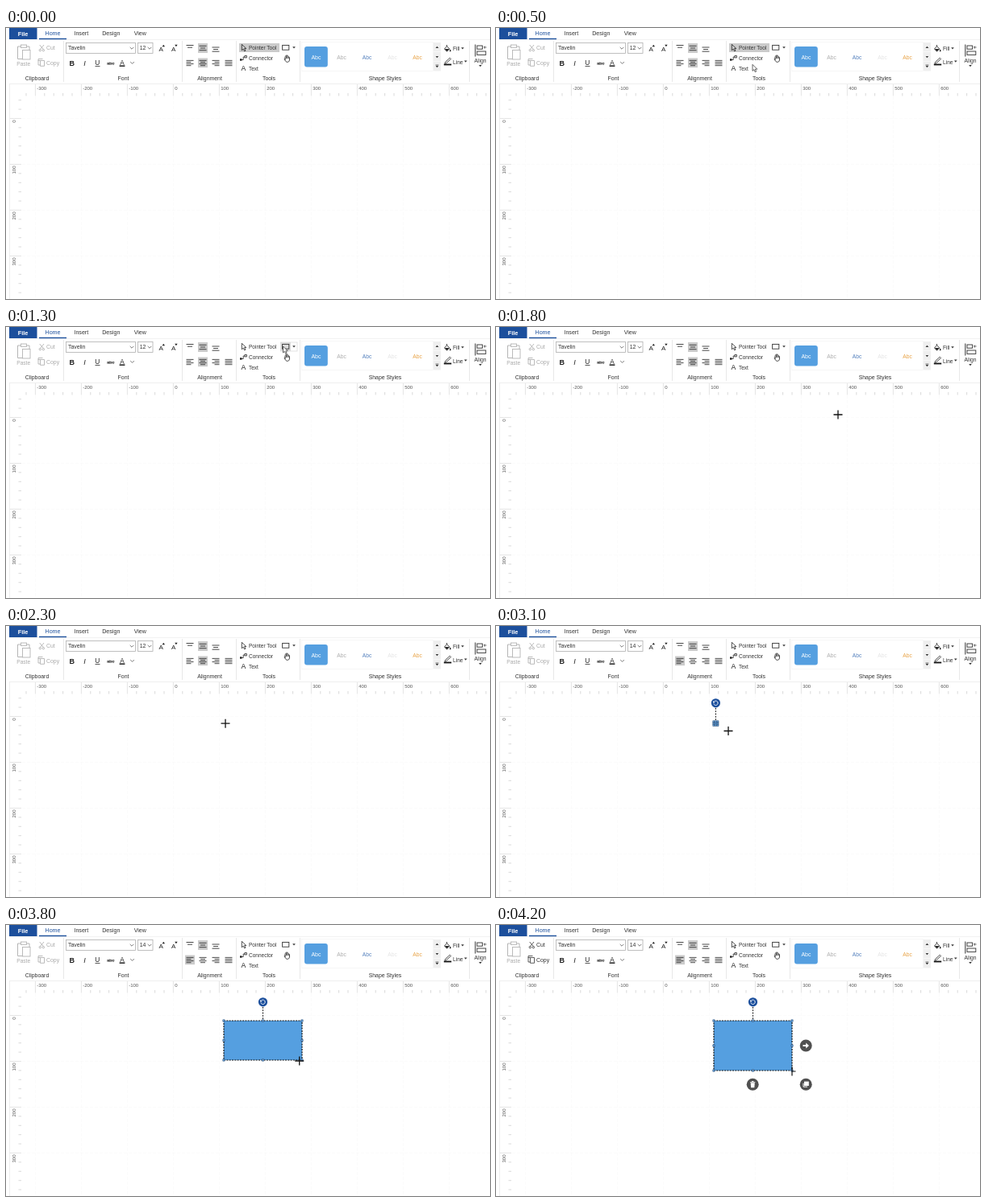
Recreate the animation shown at these times as an HTML page. Size 600 by 337 pixels, loop 4.3 s.

```html
<!DOCTYPE html>
<html lang="en">
<head>
<meta charset="utf-8">
<title>Drawing a rectangle</title>
<style>
html, body { margin: 0; width: 100%; height: 100%; overflow: hidden; background: #fff; }
svg { display: block; width: 100%; height: 100%; font-family: "Liberation Sans", Arial, sans-serif; }
</style>
</head>
<body>
<svg id="stage" viewBox="0 0 600 337" preserveAspectRatio="none"></svg>
<script>
const LOOP = 4300, STEP = 100;
const BLUE = '#1c4f9c', SHAPE = '#559fe0', INK = '#333', PALE = '#a9a9a9';
const stage = document.getElementById('stage');

const path = (d, stroke = INK, w = 0.8, extra = '') =>
  `<path d="${d}" fill="none" stroke="${stroke}" stroke-width="${w}" ${extra}/>`;
const solid = (d, fill = INK) => `<path d="${d}" fill="${fill}"/>`;
const rect = (x, y, w, h, fill = 'none', extra = '') =>
  `<rect x="${x}" y="${y}" width="${w}" height="${h}" fill="${fill}" ${extra}/>`;
const text = (x, y, s, size = 7, fill = INK, extra = '') =>
  `<text x="${x}" y="${y}" font-size="${size}" fill="${fill}" ${extra}>${s}</text>`;
const mid = 'text-anchor="middle"';
const group = (id, body) => `<g id="${id}">${body}</g>`;
const chevron = (x, y) => path(`M${x - 2.3} ${y - 1.1}l2.3 2.3 2.3-2.3`, '#444', 0.7);
const down = (x, y) => solid(`M${x - 1.8} ${y - 1}h3.6l-1.8 2.2z`);
const bars = (x, y, gap, widths, align) => path(widths.map((w, i) => {
  const left = align === 'left' ? x - 4.5 : align === 'right' ? x + 4.5 - w : x - w / 2;
  return `M${left} ${y + i * gap}h${w}`;
}).join(''), '#333', 0.9);

function tabs() {
  return rect(4, 0, 34.5, 14, BLUE) +
    text(21, 9.6, 'File', 7.4, '#fff', mid + ' font-weight="bold"') +
    text(58, 9.3, 'Home', 7.1, BLUE, mid) + text(93.3, 9.3, 'Insert', 7.1, INK, mid) +
    text(130.3, 9.3, 'Design', 7.1, INK, mid) + text(166.3, 9.3, 'View', 7.1, INK, mid) +
    path('M4 14.5H600', '#ececec', 0.7) + rect(41, 12.8, 34, 1.4, BLUE);
}

function clipboard() {
  return path('M19 23h-4.5v15.500h5.500M25 23h4v4', '#b4b4b4', 1) +
    rect(18.5, 21, 7, 3.4, '#fff', 'stroke="#b4b4b4" stroke-width=".9"') +
    rect(20.5, 27.5, 9.5, 11.5, '#fff', 'stroke="#b4b4b4" stroke-width=".9"') +
    text(21.7, 47, 'Paste', 6.6, PALE, mid) +
    `<g id="edit" fill="${PALE}" stroke="${PALE}">
      <g fill="none" stroke-width=".8"><path d="M41.700 21l4.800 5.800M47 21l-4.800 5.800"/>
      <circle cx="42.300" cy="27.700" r="1.200"/><circle cx="46.400" cy="27.700" r="1.200"/>
      <path d="M42.500 40.500h-2.500v-2h5.500M40 40v6h2M42.500 40.500h5v6.800h-5z"/></g>
      <g stroke="none" font-size="6.900"><text x="50" y="27.300">Cut</text><text x="50" y="45.500">Copy</text></g>
    </g>`;
}

function fontGroup() {
  const box = 'stroke="#b0b0b0" stroke-width=".8"';
  return rect(74.5, 18.5, 86, 13, '#fff', box) + text(77, 27.4, 'Tavelin', 6.9) + chevron(156, 25) +
    rect(163.5, 18.5, 18.5, 13, '#fff', box) + text(165.7, 27.4, '12', 6.9, INK, 'id="size"') + chevron(178, 25) +
    text(189.5, 28.8, 'A', 8, '#222') + solid('M193.600 23.200l1.700-2.400 1.700 2.400z', '#222') +
    text(205, 28.8, 'A', 8, '#222') + solid('M209.200 20.800h3.400l-1.700 2.400z', '#222') +
    text(81.8, 46.5, 'B', 9, '#222', mid + ' font-weight="bold"') +
    text(97.6, 46.5, 'I', 9, '#222', mid + ' font-style="italic"') +
    text(113.4, 46, 'U', 8.4, '#222', mid) + path('M110.500 47.600h6', '#222', 0.8) +
    text(129.8, 45.8, 'abc', 5.7, '#222', mid) + path('M125 44h9.600', '#222', 0.7) +
    text(144, 45.5, 'A', 8.2, '#222', mid) + rect(140.6, 46.5, 6.8, 1.4, '#111') + chevron(156.5, 43.2);
}

function alignment() {
  const rows = [9, 6, 9, 6];
  return rect(238, 19, 12, 12, '#cbcbcb') + rect(238, 37.5, 12, 11.7, '#cbcbcb', 'id="chosen"') +
    bars(228, 21.5, 2.7, [9, 6]) + bars(244, 22.3, 2.7, [9, 6, 9]) + bars(260, 24, 2.6, [9, 6, 9]) +
    bars(228, 40.4, 2.1, rows, 'left') + bars(244, 40.4, 2.1, rows) +
    bars(260, 40.4, 2.1, rows, 'right') + bars(276, 40.4, 2.1, [9, 9, 9, 9]);
}

function tools() {
  return rect(289, 19, 50, 11, '#cbcbcb', 'id="active"') +
    path('M292.300 20.300v7.500l1.900-1.600 1.400 2.700 1.300-.6-1.400-2.700h2.400z', '#222', 0.8) +
    text(301, 26.9, 'Pointer Tool', 6.5) +
    path('M292 39.500h2.200v-3.500h2', '#222', 0.8) + rect(290, 38.3, 2.4, 2.4, '#222') +
    rect(296, 34.6, 2.3, 2.3, '#fff', 'stroke="#222" stroke-width=".8"') +
    text(301, 39.9, 'Connector', 6.5) +
    text(291.6, 53.4, 'A', 8.7, '#222') + text(301, 52.8, 'Text', 6.5) +
    group('hover', rect(340.5, 19, 12.5, 11, '#dcdcdc') + rect(340.5, 19, 20.5, 11, 'none', 'stroke="#d6d6d6" stroke-width=".7"')) +
    rect(342.6, 21.4, 8.2, 5.8, 'none', 'stroke="#333" stroke-width=".9"') + down(357, 24.2) +
    path('M346 39.500v-4q.7-1.300 1.400 0v-1.300q.7-1.200 1.400 0v1q.8-1 1.400.2v1q.9-.8 1.300.4v3.200q-.4 2.300-2.300 2.300h-1.200q-1.100 0-3-3.700 .4-1.200 1.600.3M347.400 35.500v2.500M348.800 35.200v2.800M350.200 36.400v1.800', '#222', 0.8);
}

function styles() {
  const samples = [[416, '#ababab'], [447.500, '#5580bd'], [479, '#e4e4e4'], [510, '#e8a245']];
  return rect(366.5, 17.5, 163, 36, 'none', 'stroke="#f1f1f1" stroke-width=".6"') +
    rect(370, 23, 28.8, 25.4, SHAPE, 'rx="3"') +
    text(384.4, 38.6, 'Abc', 6.9, '#fff', mid) +
    samples.map(([x, c]) => text(x, 38.6, 'Abc', 6.7, c, mid)).join('') +
    [18, 30, 42].map(y => rect(530, y, 9, 11.5, '#efefef')).join('') +
    solid('M532.500 25h3.800l-1.900-2.200z') + down(534.4, 36) + down(534.4, 48) + path('M532.500 46h3.800', INK, 0.7) +
    path('M543.500 26l3-3.200 3.300 3.200-3.300 3.100zM546.500 22.800v-1.800', '#222', 0.9) +
    solid('M544 26h5.500l-3 3zM550.700 26.200q1.800 2.800 0 3.200q-1.600-.4 0-3.200', '#222') +
    text(554, 28.3, 'Fill', 6.6) + down(566, 25.3) +
    path('M544.500 42.500l5.700-5.300 1.300 1.300-5.700 5.200-1.900.6z', '#222', 0.8) + rect(542.8, 44.6, 9.4, 1.8, '#111') +
    text(554, 44.8, 'Line', 6.6) + down(569.8, 41.5);
}

function alignButton() {
  return path('M581.800 20.500v15', '#333', 1) + rect(584, 22, 6.5, 4.2, 'none', 'stroke="#333" stroke-width=".9"') +
    rect(584, 29, 10.8, 4.4, 'none', 'stroke="#333" stroke-width=".9"') +
    path('M595.500 24h-3m1.300-1.400l-1.400 1.400 1.400 1.400', '#333', 0.8) +
    text(588, 43, 'Align', 6.7, INK, mid) + down(588, 47);
}

function rulers() {
  let out = path('M4 69.500H600M4.500 69.500V337', '#e9e9e9', 0.7);
  let minor = '', major = '', grid = '';
  for (let i = -1; i < 50; i++) {
    const x = 36.4 + i * 11.4;
    if (x > 22) i % 5 ? minor += `M${x} 81v3.500` : major += `M${x} 70v14.500`;
  }
  for (let i = -2; i < 20; i++) {
    const y = 112.5 + i * 11.4;
    i % 5 ? minor += `M15.500 ${y}h3.500` : major += `M4.500 ${y}h14.500`;
  }
  for (let k = 0; k < 10; k++) {
    const x = 36.4 + k * 57;
    grid += `M${x} 85V337`;
    out += text(x + 1.8, 77.3, (k - 3) * 100, 6, '#555');
  }
  for (let k = 0; k < 4; k++) {
    const y = 112.5 + k * 57, n = k * 100, len = k ? 10 : 3.3;
    grid += `M20 ${y}H600`;
    out += text(0, 0, n, 6, '#555', `transform="translate(11.500 ${y + 2 + len}) rotate(-90)"`);
  }
  return path(grid, '#fafafa', 0.7, 'stroke-dasharray="4 2"') + path(minor, '#cbcbcb', 0.7) +
    path(major, '#dadada', 0.7) + out;
}

function overlay() {
  const disc = (x, y, icon) => `<circle cx="${x}" cy="${y}" r="7.500" fill="#505050"/>` + icon;
  return group('drawn',
      `<rect id="box" fill="${SHAPE}" stroke="#111" stroke-width="1.200" stroke-dasharray="2 1.300"/>` +
      `<path id="stem" fill="none" stroke="#222" stroke-width="1.100" stroke-dasharray="1.800 1.500"/>` +
      `<path id="grips" fill="#6fa9df" stroke="#33577c" stroke-width=".6"/>` +
      `<g id="rotate"><circle r="5.600" fill="${BLUE}"/>` +
      path('M-2.200 -1.600A2.700 2.700 0 1 1 -2.600 .8', '#fff', 0.9) + solid('M-3.300 -2.700v2.400h2.400z', '#fff') + '</g>') +
    group('actions',
      disc(384.2, 150, solid('M380.500 149h3.700v-2.400l3.800 3.400-3.800 3.400v-2.400h-3.700z', '#fff')) +
      disc(318.2, 198.3, solid('M315.600 196.300h5.200l-.5 5.900h-4.200zM315 194.900h2v-.8h2.400v.8h2v.9h-6.400z', '#fff')) +
      disc(384.2, 198.3, rect(382, 194.6, 5.8, 5.4, '#fff') + path('M381 196.700v4.500h5', '#fff', 1))) +
    group('arrow', '<path d="M0 0v8l1.900-1.700 1.300 3 1.400-.6-1.300-2.900h2.500z" fill="#fff" stroke="#222" stroke-width=".7"/>') +
    group('cross', path('M-5.500 0H5.500M0-5.500V5.500', '#111', 1.3)) +
    group('halfCross', path('M0-5.500V5.500M0 0H4.500', '#111', 1.2));
}

const labels = [[38.5, 'Clipboard'], [145.5, 'Font'], [252.5, 'Alignment'], [326, 'Tools'], [470, 'Shape Styles']];
stage.innerHTML = rect(0, 0, 600, 337, '#fff') + tabs() + clipboard() + fontGroup() + alignment() + tools() +
  styles() + alignButton() + labels.map(([x, s]) => text(x, 64.8, s, 6.9, INK, mid)).join('') +
  path([71.5, 218.5, 285.5, 364.5, 574.5].map(x => `M${x} 16v51`).join(''), '#e2e2e2', 0.8) + rulers() + overlay();

const el = {};
stage.querySelectorAll('[id]').forEach(n => el[n.id] = n);
const set = (n, attrs) => Object.entries(attrs).forEach(([k, v]) => n.setAttribute(k, v));
const show = (n, on) => n.setAttribute('visibility', on ? 'visible' : 'hidden');

// Keys are [time, ...values], joined by straight segments.
function track(keys, t) {
  const i = keys.findIndex(k => k[0] > t);
  if (i < 0) return keys[keys.length - 1].slice(1);
  if (i === 0) return keys[0].slice(1);
  const a = keys[i - 1], b = keys[i], f = (t - a[0]) / (b[0] - a[0]);
  return a.slice(1).map((v, j) => v + (b[j + 1] - v) * f);
}

const pointer = [
  [100, 306, 47], [600, 321, 45], [700, 330, 38], [800, 338, 29], [900, 343.5, 24], [1300, 343.5, 24],
  [1400, 356, 34], [1500, 386, 57], [1600, 418, 86], [1700, 441, 104], [1800, 424, 109],
  [1900, 388, 114], [2000, 345, 118], [2100, 306, 120], [2200, 282, 121], [2300, 272, 121.2],
  [2900, 272, 121.2], [3000, 278, 124.3], [3100, 288, 130.5], [3200, 310, 140.500], [3300, 335, 151.300],
  [3400, 359, 160.300], [3500, 359, 160.300], [3700, 362, 164], [3900, 365.500, 174], [4100, 367, 182]
];
const corner = [
  [3100, 274.800, 123.300], [3200, 303, 135], [3300, 336, 147], [3400, 367, 158], [3500, 367, 158],
  [3700, 367, 163], [3900, 367, 173], [4100, 367, 181]
];
const LEFT = 270, TOP = 119;

function drawShape(t) {
  const [right, bottom] = track(corner, t);
  const cx = (LEFT + right) / 2, cy = (TOP + bottom) / 2;
  set(el.box, { x: LEFT, y: TOP, width: right - LEFT, height: bottom - TOP });
  set(el.stem, { d: `M${cx} 102V${TOP}` });
  set(el.rotate, { transform: `translate(${cx} 95.800)` });
  let d = '';
  for (const x of [LEFT, cx, right])
    for (const y of [TOP, cy, bottom])
      if (x !== cx || y !== cy) d += `M${x - 1.2} ${y - 1.2}h2.400v2.400h-2.400z`;
  set(el.grips, { d });
}

function render(time) {
  const t = Math.floor(time % LOOP / STEP) * STEP;
  const [x, y] = track(pointer, t);
  const drawing = t >= 3000, done = t >= 4200, onPage = t >= 1600;
  const at = { transform: `translate(${x} ${y})` };
  [el.arrow, el.cross, el.halfCross].forEach(n => set(n, at));
  show(el.arrow, t >= 100 && !onPage);
  show(el.cross, onPage && !done);
  show(el.halfCross, done);
  show(el.active, t < 1200);
  show(el.hover, t >= 900 && t < 1400);
  show(el.drawn, drawing);
  show(el.actions, done);
  el.size.textContent = drawing ? '14' : '12';
  set(el.chosen, { x: drawing ? 222 : 238 });
  const tone = done ? INK : PALE;
  set(el.edit, { fill: tone, stroke: tone });
  drawShape(t);
}

const start = performance.now();
function tick() {
  render(performance.now() - start);
  requestAnimationFrame(tick);
}
tick();
</script>
</body>
</html>
```
